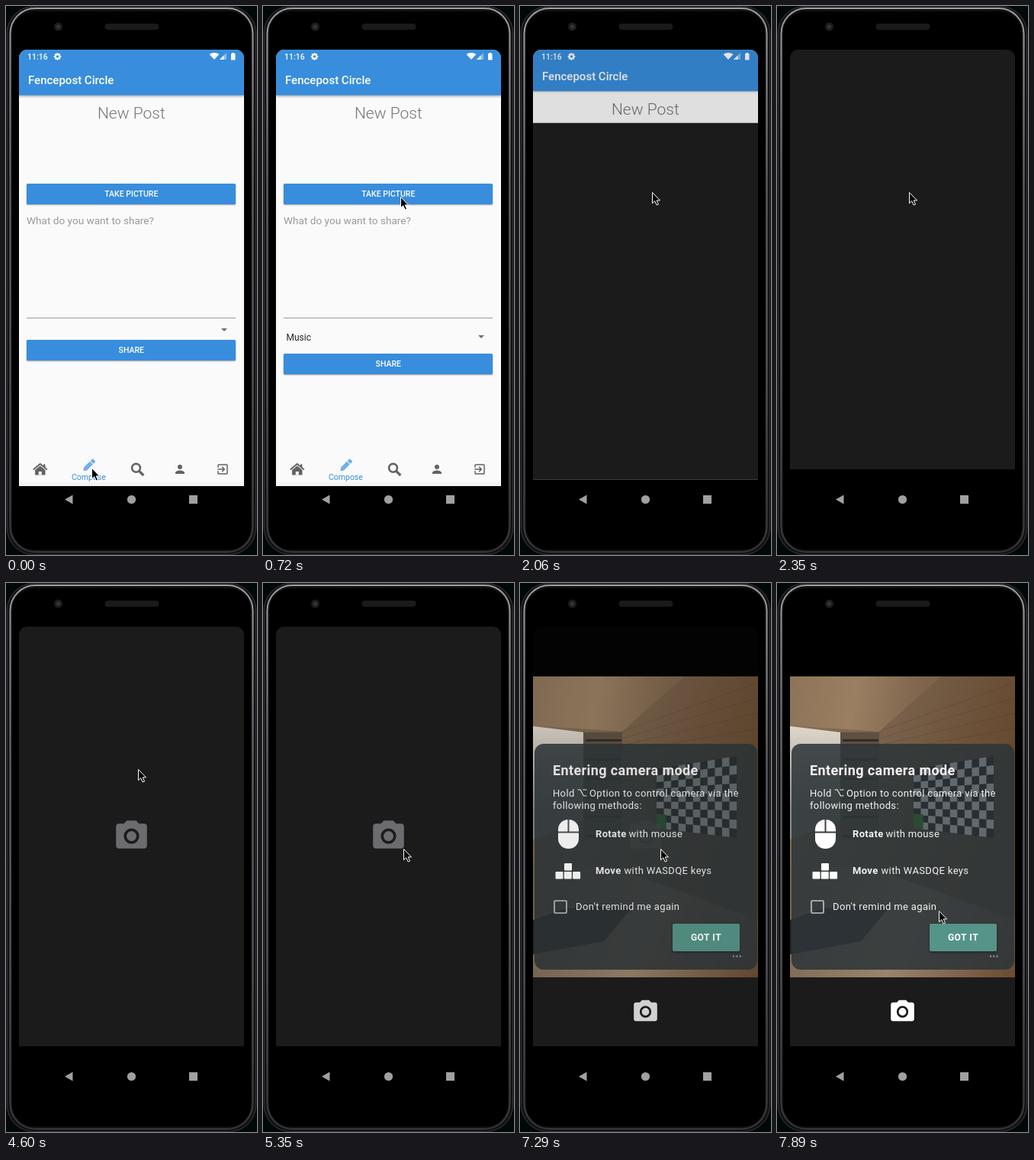
These frames come from a looping animation (329 px wide and 717 px high, 8000 ms). An HTML page with a canvas:

```html
<!DOCTYPE html>
<html lang="en">
<head>
<meta charset="utf-8">
<title>Phone demo</title>
<style>
html, body { margin: 0; width: 100%; height: 100%; overflow: hidden; background: #000; }
canvas { display: block; width: 329px; height: 717px; }
</style>
</head>
<body>
<canvas id="stage" width="329" height="717"></canvas>
<script>
const ctx = document.getElementById('stage').getContext('2d');
const LOOP = 8000, STEP = 145;
const BLUE = '#388ddc', DARK = '#1b1b1b', GRAY = '#636363';

const CAMERA = new Path2D('M9 2L7.17 4H4a2 2 0 0 0-2 2v12a2 2 0 0 0 2 2h16a2 2 0 0 0 2-2V6a2 2 0 0 0-2-2h-3.17L15 2H9zM12 17a5 5 0 1 1 0-10 5 5 0 0 1 0 10zM15.2 12a3.2 3.2 0 1 0-6.4 0 3.2 3.2 0 0 0 6.4 0z');
const PERSON = new Path2D('M12 12a4 4 0 1 0 0-8 4 4 0 0 0 0 8zm0 2c-2.67 0-8 1.34-8 4v2h16v-2c0-2.66-5.33-4-8-4z');
const EXIT = new Path2D('M10.09 15.59L11.5 17l5-5-5-5-1.41 1.41L12.67 11H3v2h9.67l-2.58 2.59zM19 3H5a2 2 0 0 0-2 2v4h2V5h14v14H5v-4H3v4a2 2 0 0 0 2 2h14a2 2 0 0 0 2-2V5a2 2 0 0 0-2-2z');
const POINTER = new Path2D('M.5 .5V14.7L3.7 11.7L6.2 17L8.5 16L6.2 10.9H10.5Z');

// progress from 0 to 1 in n visible steps
const stepped = (t, start, n) => Math.min(1, Math.max(0, Math.floor((t - start) / STEP) / n));
const easeOut = (u, power) => 1 - (1 - u) ** power;
const mix = (a, b, u) => a + (b - a) * u;

function rect(color, x, y, w, h, r = 0) {
  ctx.fillStyle = color;
  ctx.beginPath();
  ctx.roundRect(x, y, w, h, r);
  ctx.fill();
}

function frame(color, width, x, y, w, h, r) {
  ctx.strokeStyle = color;
  ctx.lineWidth = width;
  ctx.beginPath();
  ctx.roundRect(x, y, w, h, r);
  ctx.stroke();
}

function poly(color, ...p) {
  ctx.fillStyle = color;
  ctx.beginPath();
  for (let i = 0; i < p.length; i += 2) ctx.lineTo(p[i], p[i + 1]);
  ctx.closePath();
  ctx.fill();
}

function line(color, width, ...p) {
  ctx.strokeStyle = color;
  ctx.lineWidth = width;
  ctx.beginPath();
  for (let i = 0; i < p.length; i += 2) ctx.lineTo(p[i], p[i + 1]);
  ctx.stroke();
}

function disc(color, x, y, r) {
  ctx.fillStyle = color;
  ctx.beginPath();
  ctx.arc(x, y, r, 0, 7);
  ctx.fill();
}

function ring(color, x, y, r, width) {
  ctx.strokeStyle = color;
  ctx.lineWidth = width;
  ctx.beginPath();
  ctx.arc(x, y, r, 0, 7);
  ctx.stroke();
}

function text(str, x, y, size, color, weight = 400, align = 'left', spacing = 0) {
  ctx.font = `${weight} ${size}px Roboto, sans-serif`;
  ctx.letterSpacing = spacing + 'px';
  ctx.textAlign = align;
  ctx.fillStyle = color;
  ctx.fillText(str, x, y);
}

function icon(path, cx, cy, scale, color) {
  ctx.save();
  ctx.translate(cx - 12 * scale, cy - 12 * scale);
  ctx.scale(scale, scale);
  ctx.fillStyle = color;
  ctx.fill(path, 'evenodd');
  ctx.restore();
}

function shade(x0, y0, x1, y1, ...colors) {
  const g = ctx.createLinearGradient(x0, y0, x1, y1);
  colors.forEach((c, i) => g.addColorStop(i / (colors.length - 1), c));
  return g;
}

function withAlpha(a, draw) {
  ctx.save();
  ctx.globalAlpha *= a;
  draw();
  ctx.restore();
}

function withShadow(color, blur, y, draw) {
  ctx.save();
  ctx.shadowColor = color;
  ctx.shadowBlur = blur;
  ctx.shadowOffsetY = y;
  draw();
  ctx.restore();
}

function phone() {
  rect('#010808', 0, 0, 329, 717);
  rect('#121214', 0, 0, 329, 717, 36);
  frame('#36363a', 1, 1.5, .5, 326, 716, 35);
  frame(shade(0, 0, 0, 717, '#a0a0a4', '#66666b', '#5c5c61', '#37373a'), 2, 5.5, 3, 318, 710, 33);
  rect('#000', 8, 7, 313, 703, 29);
  disc('#1c1c20', 68.5, 27, 5.5);
  disc('#34343c', 68.5, 27, 2.6);
  rect('#1a1a1a', 129.5, 23, 71, 8, 4);
  poly('#a0a0a0', 77, 644.5, 87.5, 638.5, 87.5, 650.5);
  disc('#a0a0a0', 164.5, 644.5, 5.6);
  rect('#a0a0a0', 240, 639, 11, 11);
}

function clipScreen() {
  ctx.beginPath();
  ctx.roundRect(17, 57, 295, 570, [11, 11, 0, 0]);
  ctx.clip();
}

function statusBar() {
  text('11:16', 28, 70, 10.5, '#fff', 500);
  ring('#fff', 67.5, 66, 2.8, 2);
  for (let i = 0; i < 8; i++) {
    const c = Math.cos(i * Math.PI / 4), s = Math.sin(i * Math.PI / 4);
    line('#fff', 1.8, 67.5 + c * 3, 66 + s * 3, 67.5 + c * 4.8, 66 + s * 4.8);
  }
  ctx.fillStyle = '#fff';
  ctx.beginPath();
  ctx.moveTo(273, 70);
  ctx.lineTo(266.5, 63);
  ctx.quadraticCurveTo(273, 58.8, 279.5, 63);
  ctx.fill();
  poly('rgba(255,255,255,.4)', 280, 70, 289, 61, 289, 70);
  poly('#fff', 280, 70, 285.5, 64.5, 285.5, 70);
  rect('#fff', 295, 62, 5.5, 8.5, .6);
  rect('#fff', 296.5, 61, 2.5, 2);
}

function button(label, y) {
  withShadow('rgba(0,0,0,.35)', 2, 1, () => rect(BLUE, 27, y, 274, 27, 1.5));
  text(label, 164.3, y + 17.3, 10.5, '#fff', 500, 'center');
}

function house(x, y) {
  line(GRAY, 2, x - 9, y, x, y - 7.5, x + 9, y);
  poly(GRAY, x - 6.7, y + .5, x, y - 5, x + 6.7, y + .5, x + 6.7, y + 7, x - 6.7, y + 7);
  rect('#fafafa', x - 2, y + 2.5, 4, 4.5);
  rect(GRAY, x + 4.2, y - 7, 2.4, 4);
}

function pencil(x, y) {
  ctx.save();
  ctx.translate(x, y);
  ctx.rotate(-Math.PI / 4);
  poly('#70b0ea', -10.5, 0, -6.5, -2.8, 4.5, -2.8, 4.5, 2.8, -6.5, 2.8);
  rect('#70b0ea', 5.5, -2.8, 4.2, 5.6, 1);
  ctx.restore();
}

function bottomNav() {
  rect('#f3f3f3', 17, 622, 295, 5);
  house(44.8, 605.5);
  pencil(108.7, 599.8);
  text('Compose', 108.4, 619, 10.5, BLUE, 400, 'center');
  ring(GRAY, 170.5, 603.3, 5.4, 2.6);
  line(GRAY, 3.2, 174.5, 607.3, 180.3, 613);
  icon(PERSON, 228, 605, .75, GRAY);
  icon(EXIT, 284, 605, .75, GRAY);
}

function composeScreen(t, shift = 0) {
  const loaded = t >= 140, drop = loaded ? 18 : 0, arrowY = loaded ? 430 : 421;
  rect('#fafafa', 17, 57, 295, 570);
  ctx.save();
  ctx.translate(0, -shift);
  withShadow('rgba(0,0,0,.35)', 3, 1, () => rect(BLUE, 17, 40, 295, 76.5));
  text('Fencepost Circle', 29, 102, 15, '#fff', 500);
  text('New Post', 164.3, 147, 21, '#757575', 300, 'center');
  button('TAKE PICTURE', 232);
  withAlpha(.06 * stepped(t, 1030, 3), () => rect('#000', 27, 232, 274, 27, 1.5));
  text('What do you want to share?', 27, 285, 13.6, '#9a9a9a');
  rect('#999', 27, 407, 274, 1);
  if (loaded) text('Music', 30.5, 436.5, 12, '#212121');
  poly('#707070', 282, arrowY, 290, arrowY, 286, arrowY + 4);
  button('SHARE', 436 + drop);
  bottomNav();
  ctx.restore();
  statusBar();
}

function room() {
  rect('#000', 17, 57, 295, 65);
  rect(DARK, 17, 515, 295, 90);
  ctx.save();
  ctx.beginPath();
  ctx.rect(17, 122, 295, 393);
  ctx.clip();
  // wall and ceiling
  rect(shade(17, 122, 312, 220, '#8c7459', '#775f49', '#65492f'), 17, 122, 295, 393);
  poly(shade(17, 122, 190, 150, '#8d7358', '#9a7f62', '#7d644b'), 17, 122, 215, 122, 134, 194, 17, 186);
  for (let i = 0; i < 8; i++) line('rgba(50,32,18,.16)', 1, 134, 194 + i * 9, 312, 130 + i * 20);
  // window, shelf, floor, table
  poly(shade(17, 186, 17, 300, '#e0d8cc', '#8c8c88'), 17, 187, 83, 195, 83, 310, 17, 335);
  rect('#5d5042', 83, 195, 51, 140);
  for (let y = 204; y < 330; y += 25) rect('#332c25', 86, y, 47, 3);
  poly(shade(17, 400, 312, 515, '#7a6552', '#9a846c', '#6a4a33'), 17, 370, 120, 370, 312, 440, 312, 515, 17, 515);
  poly('#2b2622', 17, 440, 60, 425, 150, 420, 110, 468, 17, 485);
  ctx.restore();
  rect('rgba(45,53,57,.86)', 19, 210, 292, 295, 12);
  checkers(11, 9);
}

// checkered wall panel in perspective
function checkers(cols, rows) {
  const px = u => 179 + 105 * u;
  const py = (u, v) => 243 - 17 * u + v * (77 + 30 * u);
  const quad = (color, u0, v0, u1, v1) => poly(color,
    px(u0), py(u0, v0), px(u1), py(u1, v0), px(u1), py(u1, v1), px(u0), py(u0, v1));
  quad('#282e31', 0, 0, 1, 1);
  for (let c = 0; c < cols; c++)
    for (let r = (c + 1) % 2; r < rows; r += 2)
      quad('#62696c', c / cols, r / rows, (c + 1) / cols, (r + 1) / rows);
  quad('#2a4a34', 0, .76, .12, 1);
}

function dialog() {
  const say = (str, x, y, weight = 400) => text(str, x, y, 13, '#f4f4f4', weight, 'left', .35);
  text('Entering camera mode', 43, 251, 18, '#f4f0f0', 700, 'left', .4);
  say('Hold', 43, 279);
  line('#f4f4f4', 1.1, 75.5, 270, 79, 270, 83.5, 278, 87.5, 278);
  line('#f4f4f4', 1.1, 82.5, 270, 87.5, 270);
  say('Option to control camera via the', 91, 279);
  say('following methods:', 43, 295);

  rect('#fff', 50, 309, 27, 38, 13);
  rect('#3a4043', 50, 324.5, 27, 2);
  rect('#3a4043', 62.5, 309, 2, 16);
  say('Rotate', 99, 332, 700);
  say('with mouse', 142.5, 332);

  rect('#fff', 58, 366, 10, 9.5, 1);
  for (let i = 0; i < 3; i++) rect('#fff', 46.5 + i * 11.3, 377, 10, 9.5, 1);
  say('Move', 99, 380, 700);
  say('with WASDQE keys', 136.5, 380);

  frame('#c4c4c4', 1.6, 45, 415, 16, 16, 1);
  say("Don't remind me again", 73, 427);
  withShadow('rgba(0,0,0,.4)', 3, 1.5, () => rect('#559488', 200, 445, 88, 36, 2));
  text('GOT IT', 244, 467, 12, '#fff', 700, 'center', .5);
  for (let i = 0; i < 3; i++) disc('#8d9294', 280 + i * 4.3, 487.5, 1.2);
}

function openingScreen(t) {
  const u = stepped(t, 1915, 3);
  const top = mix(627, 57, easeOut(u, 4.4));
  const bottom = mix(627, 605, easeOut(u, 1.2));
  composeScreen(t, 16 * u);
  withAlpha(.11, () => rect('#000', 17, 57, 295, 570));
  rect(DARK, 17, top, 295, bottom - top);
  rect('#000', 17, bottom, 295, 627 - bottom);
}

function cameraScreen(t) {
  const u = stepped(t, 6995, 3);
  const roomAlpha = u ** 3 / (u ** 3 + (1 - u) ** 3);
  const dialogAlpha = easeOut(u, 2.2);
  if (u) room();
  withAlpha(1 - roomAlpha, () => rect(DARK, 17, 57, 295, 548));
  if (t >= 4600) withAlpha(1 - dialogAlpha, () => icon(CAMERA, 164.5, 330.6, 2.03, '#6c6c70'));
  withAlpha(dialogAlpha, dialog);
  withAlpha(mix(roomAlpha, u, .4), () => icon(CAMERA, 164.5, 560, 1.53, '#fff'));
}

// three glides: to the button, to the middle, to the dialog
function pointerAt(t) {
  if (t < 290) return [112, 603];
  const a = stepped(t, 0, 5), b = stepped(t, 4755, 4), c = stepped(t, 7595, 2);
  if (c) return [mix(184, 212, easeOut(c, 4)), mix(347, 428, easeOut(c, 4))];
  if (b) return [173 + 11 * b ** 8, mix(243, 347, b - b * b * (1 - b))];
  const e = easeOut(a, 2.5);
  return [mix(112, 173, e) + 243 * a * (1 - a) ** 2, mix(603, 243, e)];
}

function pointer(t) {
  const [x, y] = pointerAt(t).map(Math.round);
  ctx.save();
  ctx.translate(x, y);
  ctx.lineJoin = 'round';
  ctx.fillStyle = '#000';
  ctx.fill(POINTER);
  ctx.strokeStyle = '#fff';
  ctx.lineWidth = 1;
  ctx.stroke(POINTER);
  ctx.restore();
}

function draw(t) {
  phone();
  ctx.save();
  clipScreen();
  if (t < 2060) composeScreen(t);
  else if (t < 2350) openingScreen(t);
  else cameraScreen(t);
  ctx.restore();
  pointer(t);
}

const start = performance.now();
function tick() {
  draw((performance.now() - start) % LOOP);
  requestAnimationFrame(tick);
}
tick();
</script>
</body>
</html>
```
